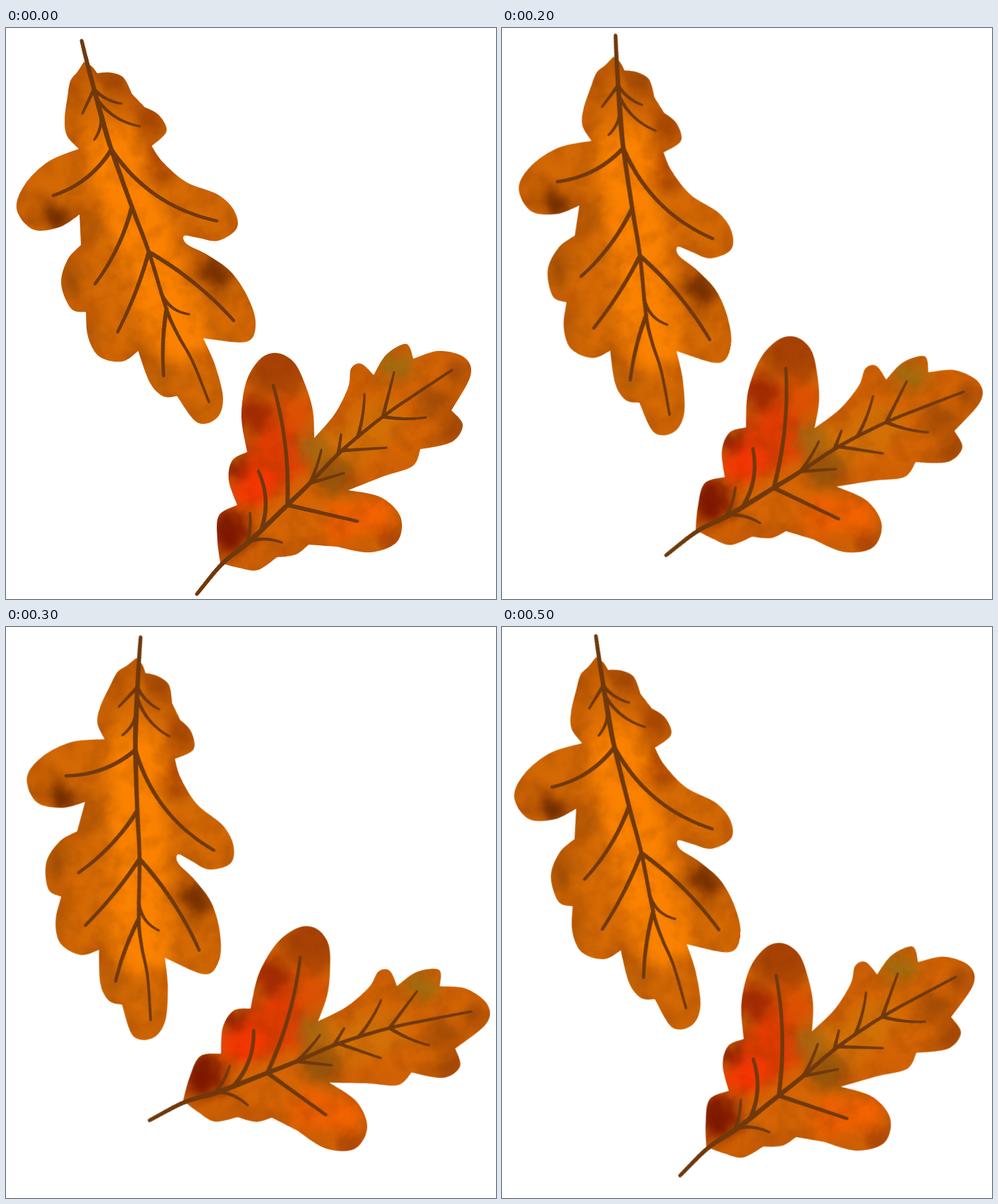
Recreate the animation shown at these times as an HTML page. Size 693 by 808 pixels, loop 600 ms.

```html
<!DOCTYPE html>
<html lang="en">
<head>
<meta charset="utf-8">
<title>Autumn leaves</title>
<style>
  html, body { margin: 0; width: 100%; height: 100%; overflow: hidden; background: #fff; }
  svg { display: block; width: 693px; height: 808px; }
</style>
</head>
<body>
<svg id="stage" xmlns="http://www.w3.org/2000/svg">
  <defs>
    <filter id="wash" filterUnits="userSpaceOnUse" x="-40" y="-40" width="780" height="890" color-interpolation-filters="sRGB">
      <feGaussianBlur stdDeviation="10" result="soft"/>
      <feTurbulence type="fractalNoise" baseFrequency=".03" numOctaves="3" seed="4" result="noise"/>
      <feDisplacementMap in="soft" in2="noise" scale="24" xChannelSelector="R" yChannelSelector="G"/>
    </filter>
    <filter id="grain" filterUnits="userSpaceOnUse" x="-40" y="-40" width="780" height="890" color-interpolation-filters="sRGB">
      <feTurbulence type="fractalNoise" baseFrequency=".035" numOctaves="4" seed="9"/>
      <feColorMatrix values="0 0 0 0 .45  0 0 0 0 .18  0 0 0 0 0  1.6 0 0 0 -.7"/>
    </filter>
  </defs>
</svg>
<script>
// outline: key points of each lobe; lobes meet in sharp corners at "/".
// veins: height where it leaves the spine, tip x, tip y, bow.
// spots: x, y, radius, colour.  poses: dx, dy, angle.
const leaves = [
  {
    id: 'amber',
    origin: [189.75, 264],
    poses: [[0, 0, 0], [0.5, 1.8, 5.8], [3.75, 4, 11.3], [3.75, 10, 17.9]],
    base: '#d56a04', edge: '#b05004', glow: '#fb8200', glowWidth: 76, glowFrom: 3,
    outline: `110,48 121,54 129,64 / 147,63 166,70 178,93 / 196,112 / 216,123 227,146 206,167 /
      222,190 255,218 300,236 323,259 326,284 300,301 272,297 252,294 256,306 285,321 318,345
      342,381 353,418 340,444 279,439 / 296,478 307,525 297,553 270,558 242,521 /
      222,521 203,501 187,457 / 164,472 132,465 116,437 113,402 / 92,397 78,362 87,328 106,307 /
      104,264 / 75,282 38,285 15,256 27,221 60,189 103,171 / 86,152 83,128 87,97 91,75 101,62 110,48`,
    spine: '107,18 118,62 135,125 149,172 178,253 202,317 227,398 243,434 264,472 287,529',
    veins: [[88, 108, 121, 0], [86, 163, 107, .17], [103, 189, 139, .2], [125, 125, 158, -.16],
      [170, 67, 237, -.18], [174, 298, 273, .2], [253, 126, 362, -.1], [317, 158, 430, -.05],
      [320, 322, 414, -.08], [380, 259, 405, .27], [398, 223, 492, .06]],
    spots: `72 268 24 #762f00; 298 346 23 #742e00; 203 124 24 #ad4a02; 150 74 22 #a84c04; 215 192 20 #b04802;
      92 355 20 #a65206; 119 282 15 #b85c06; 120 435 18 #b65a06; 217 495 18 #b45a06`
  },
  {
    id: 'crimson',
    origin: [444, 622],
    poses: [[0, 0, 0], [-1.75, -7.25, 5.5], [-3.25, -13, 12.5], [-11.5, -22.25, 22.6]],
    base: '#d46404', edge: '#b65206', glow: '#d27006', glowWidth: 56, glowFrom: 5,
    outline: `303,757 299,725 301,690 327,675 / 315,640 320,612 341,600 /
      333,550 340,500 360,468 384,460 408,474 424,507 434,542 436,580 /
      465,546 484,508 488,482 502,475 520,491 / 538,462 566,447 576,468 /
      612,457 648,466 657,492 630,541 / 646,562 630,586 586,596 / 575,620 535,634 484,654 /
      530,664 558,692 553,727 515,742 468,734 / 428,731 / 410,745 383,749 / 356,767 330,764 303,757`,
    spine: '270,801 306,758 345,726 398,675 430,644 475,598 533,550 587,513 631,484',
    veins: [[675, 378, 506, .08], [714, 357, 627, .2], [728, 345, 686, .1], [727, 390, 728, -.16],
      [676, 497, 698, 0], [645, 446, 597, .05], [643, 478, 630, 0], [601, 474, 575, 0],
      [598, 538, 594, 0], [580, 507, 518, .07], [549, 549, 487, 0], [552, 594, 551, .08]],
    spots: `385 478 40 #a84204; 400 550 32 #dc5002; 385 605 42 #e03c02; 350 648 32 #f43602; 350 548 26 #a22a02;
      326 622 17 #862002; 316 712 30 #801800; 434 596 24 #aa6810; 465 634 26 #96540a; 550 478 24 #a46c0e;
      642 490 20 #a84c06; 604 530 20 #a04a05; 632 568 20 #a24804; 520 688 26 #f46200; 475 702 28 #ee6000;
      546 724 18 #a84205`
  }
];

const stage = document.getElementById('stage');
const sheet = { x: -40, y: -40, width: 780, height: 890 };
const brown = '#70390c';

function add(parent, tag, attrs) {
  const el = document.createElementNS(stage.namespaceURI, tag);
  for (const key in attrs) el.setAttribute(key, attrs[key]);
  return parent.appendChild(el);
}

function seeded(seed) {
  return () => (seed = seed * 16807 % 2147483647) / 2147483647;
}

const points = text => text.trim().split(/\s+/).map(p => p.split(',').map(Number));
const path = pts => 'M' + pts.map(p => p[0].toFixed(1) + ' ' + p[1].toFixed(1)).join('L');

// Catmull-Rom curve through the points.
function curve(pts, steps = 10) {
  const out = [pts[0]];
  for (let i = 0; i < pts.length - 1; i++) {
    const a = pts[i - 1] || pts[i], b = pts[i], c = pts[i + 1], d = pts[i + 2] || c;
    for (let s = 1; s <= steps; s++) {
      const t = s / steps;
      out.push([0, 1].map(k => b[k] + 0.5 * t * (c[k] - a[k] +
        t * (2 * a[k] - 5 * b[k] + 4 * c[k] - d[k] + t * (3 * (b[k] - c[k]) + d[k] - a[k])))));
    }
  }
  return out;
}

function outline(text) {
  let last = [];
  return text.split('/').flatMap(part => {
    const pts = [...last, ...points(part)];
    last = pts.slice(-1);
    return curve(pts);
  });
}

// Side vein: leaves the spine at a height and bows sideways on its way to the tip.
function sideVein(spine, [height, x, y, bow]) {
  const off = p => Math.abs(p[1] - height);
  const [sx, sy] = spine.reduce((best, p) => off(p) < off(best) ? p : best);
  const cx = (sx + x) / 2 - bow * (y - sy), cy = (sy + y) / 2 + bow * (x - sx);
  return Array.from({ length: 21 }, (_, i) => {
    const t = i / 20, u = 1 - t;
    return [u * u * sx + 2 * u * t * cx + t * t * x, u * u * sy + 2 * u * t * cy + t * t * y];
  });
}

// Line that narrows from one width to another.
function taper(parent, line, w0, w1) {
  for (let i = 1; i < line.length; i++) {
    add(parent, 'path', {
      d: path([line[i - 1], line[i]]), stroke: brown, 'stroke-linecap': 'round',
      'stroke-width': w0 + (w1 - w0) * i / line.length
    });
  }
}

function paintBody(group, leaf, edge, spinePoints) {
  const rand = seeded(77);
  const clip = add(stage.querySelector('defs'), 'clipPath', { id: leaf.id });
  add(clip, 'path', { d: path(edge) + 'Z' });

  const body = add(group, 'g', { 'clip-path': `url(#${leaf.id})` });
  const paint = add(body, 'g', { filter: 'url(#wash)' });
  add(paint, 'rect', { ...sheet, fill: leaf.base });
  for (let i = 0; i < edge.length; i += 12) {
    add(paint, 'circle', { cx: edge[i][0], cy: edge[i][1], r: 10 + 12 * rand(), fill: leaf.edge, opacity: 0.2 + 0.5 * rand() });
  }
  add(paint, 'path', {
    d: path(spinePoints.slice(leaf.glowFrom, -2)), fill: 'none', stroke: leaf.glow,
    'stroke-width': leaf.glowWidth, 'stroke-linecap': 'round', 'stroke-linejoin': 'round'
  });
  for (const spot of leaf.spots.split(';')) {
    const [cx, cy, r, fill] = spot.trim().split(' ');
    add(paint, 'circle', { cx, cy, r, fill });
  }
  add(body, 'rect', { ...sheet, filter: 'url(#grain)', opacity: 0.3 });
}

function drawLeaf(leaf) {
  const group = add(stage, 'g', {});
  const spinePoints = points(leaf.spine);
  const spine = curve(spinePoints);
  paintBody(group, leaf, outline(leaf.outline), spinePoints);
  taper(group, spine.slice(0, 21), 5, 7);
  taper(group, spine.slice(20), 7, 3.5);
  for (const vein of leaf.veins) {
    const line = sideVein(spine, vein);
    const long = Math.hypot(line[20][0] - line[0][0], line[20][1] - line[0][1]) > 80;
    taper(group, line, long ? 6 : 5, long ? 4.5 : 3);
  }
  return group;
}

// Swing out and back, holding each pose for 100 ms.
const order = [0, 1, 2, 3, 2, 1, 0];
for (const leaf of leaves) {
  const group = drawLeaf(leaf);
  group.style.transformOrigin = leaf.origin.map(v => v + 'px').join(' ');
  const steps = order.map((n, i) => {
    const [dx, dy, angle] = leaf.poses[n];
    return { offset: i / 6, transform: `translate(${dx}px, ${dy}px) rotate(${angle}deg)`, easing: 'step-end' };
  });
  group.animate(steps, { duration: 600, iterations: Infinity });
}
</script>
</body>
</html>
```
